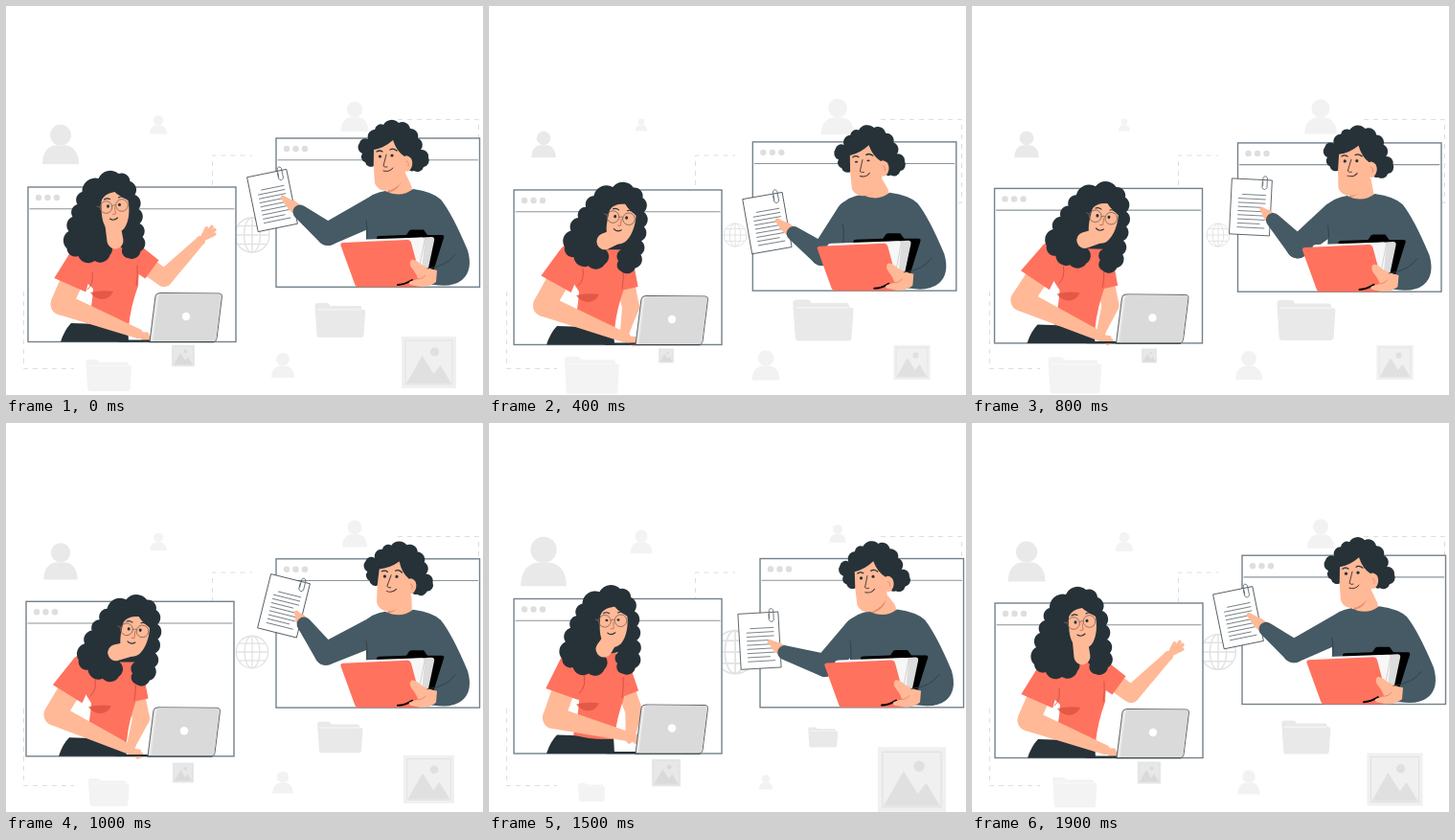
Write an HTML page that moves like this. It is 498 px wide and 406 px high and loops after 2000 ms.

```html
<!DOCTYPE html>
<html lang="en">
<head>
<meta charset="utf-8">
<title>Video call</title>
<style>
  html, body { margin: 0; width: 100%; height: 100%; overflow: hidden; background: #fff; }
  svg { display: block; width: 498px; height: 406px; }
</style>
</head>
<body>
<svg id="stage" viewBox="0 0 498 406" width="498" height="406"></svg>
<script>
const LOOP = 2000, STEP = 100;
const KEYS = [0, 200, 600, 1000, 1300, 1700, 1900];
const SKIN = '#ffb997', CORAL = '#ff725e', HAIR = '#263238', SWEATER = '#455a64';

// Monotone cubic through one value per key, wrapping at the loop end.
function at(values, t) {
  const n = KEYS.length;
  const key = i => KEYS[(i + n) % n] + Math.floor(i / n) * LOOP;
  const val = i => values[(i + n) % n];
  const slope = i => (val(i + 1) - val(i)) / (key(i + 1) - key(i));
  const tangent = i => {
    const a = slope(i - 1), b = slope(i);
    return a * b > 0 ? 2 * a * b / (a + b) : 0;
  };
  let i = n - 1;
  while (KEYS[i] > t) i--;
  const h = key(i + 1) - key(i), u = (t - key(i)) / h, w = 1 - u;
  return val(i) * (1 + 2 * u) * w * w + tangent(i) * h * u * w * w
    + val(i + 1) * u * u * (3 - 2 * u) - tangent(i + 1) * h * u * u * w;
}

const leftWin = { x: [23, 26, 26, 21, 26, 26, 24], y: [189, 190.3, 193, 186.3, 182, 186, 188] };
const rightWin = { x: [282, 278, 274, 282, 284, 282, 282], y: [138, 139, 144, 141.8, 142, 140.5, 138.2] };

const woman = {
  head: { x: [89.5, 106.5, 113.5, 113, 113, 91.5, 90], y: [20, 27, 30, 30, 28, 19, 20] },
  tilt: [0, 11, 16, 14, 12, -1, 0],
  eye: [1, 1, 1, 1, .45, 1, 1],
  shoulderL: { x: [55, 60, 60, 60, 66, 56, 55], y: [77, 70, 70, 69, 68, 69, 77] },
  elbowL: { x: [35, 35, 28, 30, 50, 33, 35], y: [122, 125, 116, 118, 126, 122, 122] },
  wristL: { x: [115, 119, 114, 109, 119, 119, 115], y: [153, 155, 154, 155, 152, 137, 153] },
  shoulderR: { x: [109, 110, 112, 109, 111, 106, 109], y: [71, 72, 75, 74, 76, 70, 71] },
  elbowR: { x: [142, 122, 122, 120, 124, 127, 142], y: [95, 122, 122, 122, 118, 116, 95] },
  wristR: { x: [180, 118, 114, 110, 120, 123, 181], y: [56, 149, 149, 149, 147, 136, 55] },
  reach: [17, 5, 5, 5, 5, 6, 17]
};

const man = {
  head: { x: [115, 114, 116, 120, 112, 112, 115], y: [18, 20, 19, 18, 20, 18, 18] },
  tilt: [0, -2, -1, 6, -3, -2, 0],
  eye: [1, .15, 1, 1, 1, 1, 1],
  paper: { x: [-4, 11.5, 16.5, 8, 0, -1, -4], y: [65, 84, 85, 49, 89, 78.5, 65] },
  turn: [-11.5, -10.5, -9, 14, -2.5, -4, -11.5],
  tip: { x: [7, 22, 27, 21, 11, 9, 7], y: [62, 82, 82, 56, 90, 79, 62] },
  wrist: { x: [25, 39, 44, 29, 28, 24, 25], y: [77, 96, 94, 68, 102, 90, 77] },
  elbow: { x: [54, 70, 73, 52, 68, 68, 54], y: [100, 115, 118, 99, 112, 110, 100] }
};

// --- markup helpers ---
const f = v => +v.toFixed(2);
const path = (d, fill, extra = '') => `<path d="${d}" fill="${fill}" ${extra}/>`;
const line = (d, color, width = 1) =>
  `<path d="${d}" fill="none" stroke="${color}" stroke-width="${width}" stroke-linecap="round" stroke-linejoin="round"/>`;
const dot = (x, y, r, fill) => `<circle cx="${x}" cy="${y}" r="${r}" fill="${fill}"/>`;
const place = (p, body, turn = 0, scale = 1) =>
  `<g transform="translate(${f(p.x)} ${f(p.y)}) rotate(${f(turn)}) scale(${f(scale)})">${body}</g>`;
const point = (track, t) => ({ x: at(track.x, t), y: at(track.y, t) });
const mix = (a, b, u) => ({ x: a.x + (b.x - a.x) * u, y: a.y + (b.y - a.y) * u });

// Tapered bar from p to q with a round or flat end.
function taper(p, q, r1, r2, fill, flat) {
  const len = Math.hypot(q.x - p.x, q.y - p.y) || 1;
  const nx = (p.y - q.y) / len, ny = (q.x - p.x) / len;
  const edge = (o, r) => `${f(o.x + nx * r)} ${f(o.y + ny * r)}`;
  const end = flat ? 'L' : `A${r2} ${r2} 0 0 0 `;
  return path(`M${edge(p, r1)}L${edge(q, r2)}${end}${edge(q, -r2)}L${edge(p, -r1)}A${r1} ${r1} 0 0 0 ${edge(p, r1)}Z`, fill);
}
const limb = (a, b, c, r, fill) => taper(a, b, r[0], r[1], fill) + taper(b, c, r[1], r[2], fill);

// Closed outline whose edges bulge outwards.
function curls(pts, fill) {
  let d = `M${pts[0]}`;
  for (let i = 1; i < pts.length; i++) {
    const r = f(Math.hypot(pts[i][0] - pts[i - 1][0], pts[i][1] - pts[i - 1][1]) * .62);
    d += `A${r} ${r} 0 0 1 ${pts[i]}`;
  }
  return path(d + 'Z', fill);
}

function fingers(from, wrist, reach) {
  const dir = Math.atan2(wrist.y - from.y, wrist.x - from.x);
  let out = dot(f(wrist.x), f(wrist.y), 5, SKIN);
  [-.32, -.08, .14, .36].forEach((a, i) => {
    const len = reach * [.85, 1.1, 1.1, .95][i];
    out += line(`M${f(wrist.x)} ${f(wrist.y)}l${f(Math.cos(dir + a) * len)} ${f(Math.sin(dir + a) * len)}`, SKIN, 3.8);
  });
  return out;
}

// --- background ---
const person = c => dot(0, -9.8, 10.9, c) + path('M-19 20.5C-19 7 -12 2 -6 1H6C12 2 19 7 19 20.5Z', c);
const picture = (bg, fg) => `<rect x="-28.5" y="-27" width="57" height="54" fill="${bg}"/>` +
  `<rect x="-24.5" y="-23" width="49" height="46" fill="none" stroke="${fg}" stroke-width=".9"/>` +
  path('M-23.5 22L-7 -7L5 12L12 3L23.5 22Z', fg) + dot(6, -11, 4.6, fg);
const folder = c => path('M-26 -15Q-26 -18 -23 -18H-13Q-11 -18 -10 -15H21Q23 -15 23 -11H25Q27 -11 26.6 -8L25 15Q25 18 22 18H-21Q-24 18 -24 15Z', c) +
  line('M-23 -11H22', '#fbfbfb', .8);
const globe = ['<circle r="18"/>', '<ellipse rx="8.5" ry="18"/>', '<path d="M0 -18V18M-18 0H18M-15 -9.5H15M-15 9.5H15"/>'].join('');

const icons = [
  [57, 144.5, 1, 0, person('#e9e9e9')],
  [159, 124, .48, 0, person('#f3f3f3')],
  [364, 115.5, .76, 1, person('#f2f2f2')],
  [289, 375, .63, 1, person('#f2f2f2')],
  [185, 365, .42, 0, picture('#e8e8e8', '#dadada')],
  [441.5, 372, 1, 0, picture('#f0f0f0', '#e0e0e0')],
  [348.5, 328, 1, 1, folder('#e9e9e9')],
  [107, 385.5, .91, 1, folder('#f3f3f3')],
  [257, 239, 1, 0, `<g fill="none" stroke="#e2e2e2" stroke-width="1.4">${globe}</g>`]
];
const dashes = '<path d="M215.5 187V156H257M18.5 298V378.5H71M409 118.5H493.5V205.5H486" fill="none" stroke="#dedede" stroke-dasharray="5 5"/>';

// Two opposite breathing scales: 0 -> 600 -> 1380 -> 2000 ms.
function pulse(t, low, high) {
  const ease = (a, b, u) => a + (b - a) * (1 - Math.cos(Math.PI * u)) / 2;
  if (t < 600) return ease(1, low, t / 600);
  if (t < 1380) return ease(low, high, (t - 600) / 780);
  return ease(high, 1, (t - 1380) / 620);
}

function frame(w, h) {
  const dots = [11, 20.5, 30].map(x => dot(x, 11, 3.2, '#dedede')).join('');
  return `<rect width="${w}" height="${h}" fill="#fff" stroke="#74818a" stroke-width="1.4"/>` +
    line(`M2 22.7H${w - 2}`, '#89949b', 1.1) + dots;
}

// --- left window ---
function womanHead(open) {
  const hair = curls([[-7, 36], [-4, 51], [-20, 57], [-37, 52], [-49, 44], [-47, 26], [-43, 11], [-38, -2],
    [-33, -15], [-16, -29], [5, -34], [17, -26], [22, -12], [26, 3], [27, 18], [30, 32], [28, 47], [15, 54], [9, 44], [9, 32]], HAIR);
  const face = path('M-13 -5C-11 -12 -4 -14 1 -15C6 -10 11 -9 15 -6C17 4 16 16 11 23C5 30 -5 28 -9 21C-13 14 -13 4 -13 -5Z', SKIN);
  const eye = (x, y) => `<ellipse cx="${x}" cy="${y}" rx="1.5" ry="${f(1.7 * open)}" fill="${HAIR}"/>`;
  const rims = '<g fill="none" stroke="#806457" stroke-width=".8"><circle cx="-8" cy="1" r="6.3"/><circle cx="8.5" cy="-1" r="6.3"/><path d="M-2 0Q0 -2 2.3 -1M-14 1L-18 0"/></g>';
  const marks = line('M-10 -7Q-7 -9 -4 -7.5M5 -9Q8 -11 11 -9', HAIR, 1.1) + line('M1 1L2 8L-1 8.5', '#c9745c', .9) +
    line('M-4 13Q0 16 4 12', HAIR, 1.1);
  return { hair, face: face + eye(-6, 0) + eye(6, -1.6) + rims + marks };
}

function drawWoman(t) {
  const p = {};
  for (const name of ['head', 'shoulderL', 'elbowL', 'wristL', 'shoulderR', 'elbowR', 'wristR']) p[name] = point(woman[name], t);
  const { head, shoulderL: a, shoulderR: b } = p;
  const tilt = at(woman.tilt, t), parts = womanHead(at(woman.eye, t));
  const neck = { x: (a.x + b.x) / 2 + 9, y: (a.y + b.y) / 2 - 18 };
  const jaw = { x: head.x - 1 - 20 * Math.sin(tilt * Math.PI / 180), y: head.y + 20 };
  const torso = path(`M${f(a.x - 13)} ${f(a.y + 4)}Q${f(a.x - 2)} ${f(a.y - 16)} ${f(neck.x - 11)} ${f(neck.y + 1)}` +
    `Q${f(neck.x)} ${f(neck.y + 7)} ${f(neck.x + 10)} ${f(neck.y + 1)}Q${f(b.x)} ${f(b.y - 14)} ${f(b.x + 8)} ${f(b.y - 4)}` +
    `L115 103Q107 125 105 146Q84 148 62 142Q67 125 68 106Z`, CORAL);
  return path('M34 161.5Q38 149 45 142L104 144L105 161.5Z', HAIR) +
    limb(b, p.elbowR, p.wristR, [10, 9, 4.8], SKIN) + fingers(p.elbowR, p.wristR, at(woman.reach, t)) +
    taper(b, mix(b, p.elbowR, .62), 13, 12, CORAL, true) + torso +
    path('M65 110Q77 107 89 109Q85 117 77 117Q69 116 65 110Z', '#d9503f', 'opacity=".75"') +
    line('M114 82Q115 93 113 103', '#c84c3c', .8) +
    limb(a, p.elbowL, p.wristL, [12, 11.5, 5], SKIN) + fingers(p.elbowL, p.wristL, 11) +
    taper(a, mix(a, p.elbowL, .56), 14, 18, CORAL, true) +
    line(`M${f(a.x + 12)} ${f(a.y + 12)}Q${f(a.x + 14)} ${f(a.y + 24)} ${f(a.x + 7)} ${f(a.y + 30)}`, '#c84c3c', .8) +
    place(head, parts.hair, tilt) + taper(jaw, neck, 8, 8.5, SKIN) + place(head, parts.face, tilt);
}

const laptop = path('M93 159.6H128V161.8H97Q93 161.8 93 159.6Z', HAIR) +
  path('M138 110.5L199 111Q203 111 202.4 115L197 158Q196.5 161.5 193 161.5H127L133 114Q133.5 110.5 138 110.5Z', '#e9e9e9', 'stroke="#4c5358" stroke-width=".9"') +
  path('M140.5 111L199 111.5Q202 111.5 201.6 115L196.5 158Q196 161 193 161H130.5L136.5 114Q137 111 140.5 111Z', '#dadada') +
  dot(165, 135, 4.2, '#fff') + line('M127 161.7H194', '#39444a', 1.1);

// --- right window ---
function manHead(open) {
  const hair = curls([[-13, 11], [-22, 7], [-25, -2], [-28, -13], [-19, -17], [-12, -27], [-3, -32], [13, -34], [25, -28],
    [33, -18], [36, -6], [44, 2], [39, 12], [29, 16], [22, 12]], HAIR);
  const face = path('M-13 -6Q-2 -8 7 -16Q11 -4 19 1Q22 -1 26 3Q29 9 25 15Q22 18 20 16L19 24Q14 32 5 36Q-8 39 -12 29Q-14 11 -13 -6Z', SKIN);
  const eye = (x, y) => `<ellipse cx="${x}" cy="${y}" rx="1.6" ry="${f(1.6 * open)}" fill="${HAIR}"/>`;
  return { hair, face: face + eye(-6.5, 1) + eye(6, 0) +
    line('M-10 -4Q-7 -6 -4 -4M4 -6Q7 -8 11 -5', HAIR, 1.3) +
    line('M0 -1L-3 11Q-1 13 1 12', '#45332f', .9) + line('M-3 16Q3 18 7 13', '#45332f', 1) +
    line('M21 6Q24 6 23 11', '#d98567', .8) };
}

function sheet() {
  let rows = '';
  for (let i = 0; i < 9; i++) rows += line(`M${i ? -13 : -9} ${f(-13 + i * 4.3)}H${i % 4 === 3 ? 10 : 15}`, '#737b80', .9);
  return '<rect x="-21" y="-29" width="42" height="58" fill="#fff" stroke="#3d474d" stroke-width=".8"/>' + rows +
    line('M11 -27V-21Q13.5 -17 16 -21V-31Q13.5 -35 11.5 -31V-23', '#59636a', .8);
}

const sweater = path('M92 66Q100 57 114 55Q130 63 143 53Q164 56 172 64Q184 79 200 117Q206 138 194 148Q184 156 165 153L94 154Q96 110 92 66Z', SWEATER);
const files = path('M105 104Q105 102 108 102L136 101L139 96.5Q140 95.5 142 95.5L154 95.5L158 101H173Q176 101 175 104L160 152H110Z', '#000') +
  path('M130 105L162 103Q166 103 165 107L157 145L120 150Z', '#dcdcdc') +
  path('M78 108Q79 106 82 106L152 103.5Q156 104 155 108L151 149L90 150Z', '#f7f7f7') +
  line('M155 106L150 132', '#c9c9c9', .8) +
  path('M70 109L137 106Q140 106 141 109L152 150Q153 155 149 155.3H86Q83 155.3 82 152L67.5 112Q66.7 109.3 70 109Z', CORAL) +
  line('M127 153Q134 153 142 148', '#000', 2) +
  path('M141 127Q144 126 148 129Q154 135 168 138L167 150Q160 156 150 155L140 153Q137 150 141 149L148 147Q147 142 142 136Q138 131 141 127Z', SKIN) +
  line('M148 147Q153 147 156 143', '#d98567', .8) +
  line('M158 136Q178 134 187 121', '#2f4049', .9);

function drawMan(t) {
  const p = {};
  for (const name of ['head', 'paper', 'tip', 'wrist', 'elbow']) p[name] = point(man[name], t);
  const parts = manHead(at(man.eye, t)), tilt = at(man.tilt, t);
  const shoulder = { x: 102, y: 76 };
  const hand = mix(p.wrist, p.tip, .45), finger = { x: p.tip.x + 4, y: p.tip.y + 6 };
  return place(p.head, parts.hair, tilt) +
    taper({ x: p.head.x + 10, y: p.head.y + 24 }, { x: 129, y: 54 }, 11.5, 13, SKIN) +
    path('M116 53Q126 52 132 42Q129 54 117 57Z', '#e58d6c') + sweater +
    place(p.head, parts.face, tilt) +
    place(p.paper, sheet(), at(man.turn, t)) +
    taper(p.wrist, hand, 6, 5.5, SKIN) + taper(hand, p.tip, 5, 2.3, SKIN) + taper(hand, finger, 5, 2.3, SKIN) +
    limb(shoulder, p.elbow, p.wrist, [15, 12, 7.5], SWEATER) +
    line('M94 86Q96 98 94 108', '#2f4049', .9) + files;
}

const stage = document.getElementById('stage');
function draw(t) {
  const scales = [pulse(t, .56, 1.28), pulse(t, 1.27, .55)];
  const back = icons.map(([x, y, size, mode, art]) => place({ x, y }, art, 0, size * scales[mode])).join('');
  stage.innerHTML = dashes + back +
    place(point(leftWin, t), frame(217, 161.5) + drawWoman(t) + laptop) +
    place(point(rightWin, t), frame(212.5, 155.3) + drawMan(t));
}

const start = performance.now();
let shown = -1;
function tick() {
  const t = Math.floor(((performance.now() - start) % LOOP) / STEP) * STEP;
  if (t !== shown) draw(shown = t);
  requestAnimationFrame(tick);
}
tick();
</script>
</body>
</html>
```
